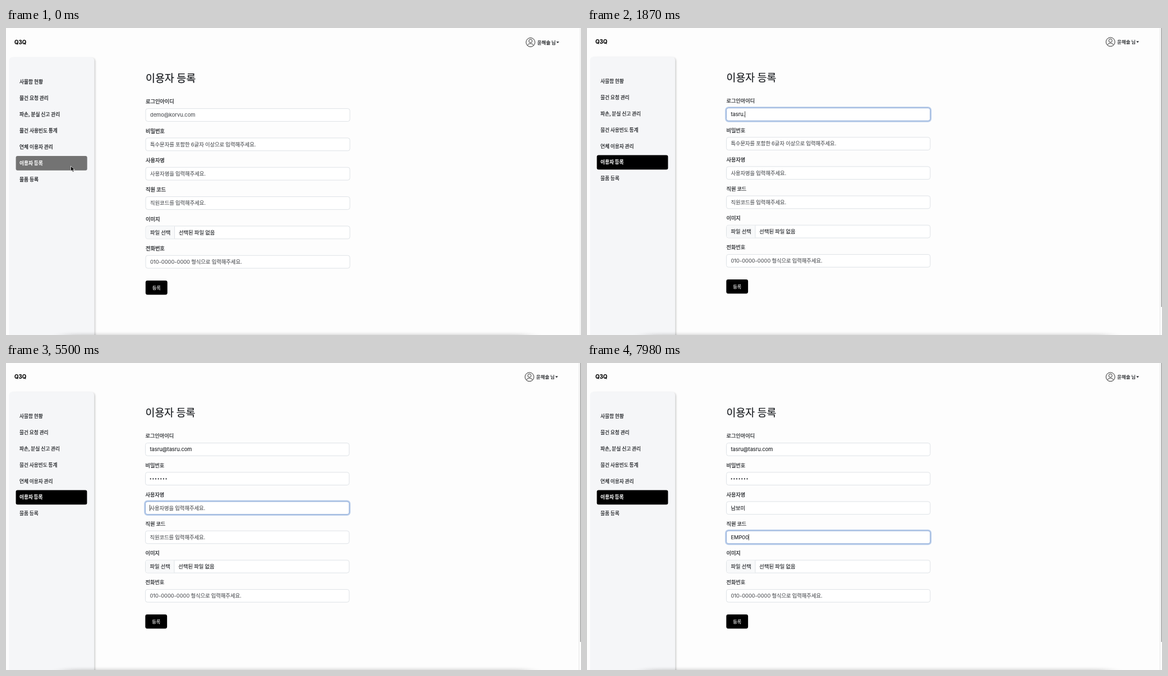
These frames come from a looping animation (1025x547 px, 8 s). An HTML page:

```html
<!DOCTYPE html>
<html lang="ko">
<head>
<meta charset="utf-8">
<style>
  html, body { margin: 0; width: 100%; height: 100%; overflow: hidden; background: #fdfdfd; }
  svg { display: block; }
  text {
    font-family: Inter, "Noto Sans CJK KR", "Noto Sans CJK", sans-serif;
    fill: currentColor; stroke: currentColor; stroke-width: .12px; word-spacing: -.4px; white-space: pre;
  }
  text[font-weight="500"] { stroke-width: .25px; }
</style>
</head>
<body>
<svg id="stage" width="1025" height="547" viewBox="0 0 1025 547">
  <defs>
    <filter id="soft" x="-20%" y="-5%" width="140%" height="110%"><feGaussianBlur stdDeviation="1.8"/></filter>
    <filter id="haze" x="-10%" y="-300%" width="120%" height="700%"><feGaussianBlur stdDeviation="14 3.5"/></filter>
  </defs>
  <rect width="1025" height="547" fill="#fdfdfd"/>
  <g id="page"></g>
  <rect x="105" y="547" width="825" height="8" fill="#000" opacity=".24" filter="url(#haze)"/>
  <path id="status" d="M0 544H147q3 0 3 3H0z"/>
  <rect id="thumb" x="1023.6" width="1.4" height="497" fill="#999"/>
  <path id="arrow" d="M0 0V9.2L2.2 7.2 3.7 10.4 5.3 9.7 3.9 6.6H6.9z" stroke="#fff" stroke-width=".7"/>
  <path id="beam" d="M-2-5Q0-5 0-4Q0-5 2-5M0-4V4M-2 5Q0 5 0 4Q0 5 2 5" fill="none" stroke="#222" stroke-width=".9"/>
</svg>
<script>
const LOOP = 8000, LEFT = 249, WIDTH = 364, STEP = 52.33, DOT = 4.65;
const INK = "#1c1f23", HINT = "#505357";
const $ = id => document.getElementById(id);
const page = $("page");

function add(tag, attrs, text) {
  const el = document.createElementNS("http://www.w3.org/2000/svg", tag);
  for (const k in attrs) el.setAttribute(k, attrs[k]);
  if (text) el.textContent = text;
  return page.appendChild(el);
}
const label = (x, y, size, text, weight = 400, color = INK) =>
  add("text", { x, y, "font-size": size, "font-weight": weight, style: `color:${color}` }, text);
const show = (el, on) => el.setAttribute("visibility", on ? "visible" : "hidden");
const ramp = (t, a, b) => Math.min(1, Math.max(0, (t - a) / (b - a)));
const ease = p => p * p * (3 - 2 * p);

// Header
add("path", { d: "M1023.5 0V560", stroke: "#e6e6e6" });
label(15, 29, 9.7, "Q3Q", 700, "#000");
add("circle", { cx: 935, cy: 25.5, r: 8, fill: "#f4f4f4", stroke: "#333", "stroke-width": 1 });
add("circle", { cx: 935, cy: 23.2, r: 3, fill: "none", stroke: "#333", "stroke-width": .9 });
add("path", { d: "M929.6 31.2Q930.5 27.6 935 27.6T940.4 31.2", fill: "none", stroke: "#333", "stroke-width": .9 });
label(947, 28.7, 8.5, "윤해솔 님", 500);
add("path", { d: "M981 24.2h5l-2.5 2.8z", fill: INK });

// Sidebar
add("rect", { x: 8, y: 53.5, width: 151.3, height: 510, rx: 6, opacity: .18, filter: "url(#soft)" });
add("rect", { x: 5.5, y: 52, width: 152, height: 510, rx: 6, fill: "#f5f6f8" });
const active = add("rect", { x: 17.6, y: 227.9, width: 127.1, height: 25.8, rx: 3 });
["사물함 현황", "물건 요청 관리", "파손, 분실 신고 관리", "물건 사용빈도 통계", "연체 이용자 관리", "이용자 등록", "물품 등록"]
  .forEach((s, i) => label(24, 99.2 + i * 28.92, 8.7, s, i == 5 ? 700 : 500, i == 5 ? "#fff" : INK));

// Form
label(249, 95.6, 18.4, "이용자 등록", 500);
const typed = (word, times) => times.map((t, i) => [t, word.slice(0, i + 1)]);
const mail = "tasru@tasru.com";
const fields = [
  { name: "로그인아이디", hint: "demo@korvu.com", from: 1390, to: 4010, keys: [
    ...typed(mail, [1520, 1590, 1660, 1730, 1850]), [1870, "tasru."], [2220, "tasru"],
    ...typed(mail, [0, 0, 0, 0, 0, 2430, 2640, 2710, 2770, 2800, 2840, 3030, 3170, 3240, 3380]).slice(5)] },
  { name: "비밀번호", hint: "특수문자를 포함한 6글자 이상으로 입력해주세요.", from: 4080, to: 5290, secret: true,
    keys: typed("•••••••", [4490, 4560, 4630, 4700, 4770, 5030, 5100]) },
  { name: "사용자명", hint: "사용자명을 입력해주세요.", from: 5340, to: 7010, compose: true,
    keys: [[6070, "ㄴ"], [6140, "나"], [6270, "남"], [6410, "남ㅂ"], [6620, "남보"], [6750, "남봄"], [6880, "남보미"]] },
  { name: "직원 코드", hint: "직원코드를 입력해주세요.", from: 7010, to: 9000,
    keys: typed("EMP00", [7360, 7500, 7640, 7840, 7980]) },
  { name: "이미지", file: true },
  { name: "전화번호", hint: "010-0000-0000 형식으로 입력해주세요." }
];
fields.forEach((f, i) => {
  const y = 155 + i * STEP;
  label(LEFT, y - 20.6, 9.2, f.name, 500);
  f.ring = add("rect", { x: LEFT - .9, y: y - 12.3, width: WIDTH + 1.8, height: 24.6, rx: 4.6, fill: "none", stroke: "#b9cdea", "stroke-width": 3, opacity: 0 });
  f.box = add("rect", { x: LEFT, y: y - 11.4, width: WIDTH, height: 22.8, rx: 3.7, fill: "#fff", stroke: "#dee2e6" });
  if (f.file) {
    add("path", { d: `M300.5 ${y - 10.9}H252.5a3 3 0 0 0-3 3v15.8a3 3 0 0 0 3 3H300.5z`, fill: "#f8f9fa" });
    add("path", { d: `M300.5 ${y - 11}v22`, stroke: "#dee2e6" });
    label(257, y + 3.4, 9.3, "파일 선택");
    label(308, y + 3.4, 9.3, "선택된 파일 없음");
    return;
  }
  f.text = label(257, y + 3.4, 9.3, f.hint, 400, HINT);
  if (!f.keys) return;
  f.dots = add("path", { stroke: INK, "stroke-width": 2.1, "stroke-linecap": "round", "stroke-dasharray": `0 ${DOT}` });
  f.caret = add("path", { stroke: "#111", "stroke-width": .8 });
  f.line = add("path", { stroke: "#333", "stroke-width": .8 });
});
add("rect", { x: 248.8, y: 450, width: 38.9, height: 25.2, rx: 3.4 });
label(260.8, 465.6, 8.2, "등록", 400, "#fff");

function drawField(f, i, t) {
  const y = 155 + i * STEP;
  let value = "", last = f.from;
  for (const [at, s] of f.keys) if (t >= at) { value = s; last = at; }
  const focus = ramp(t, f.from, f.from + 150) * (1 - ramp(t, f.to, f.to + 150));
  f.ring.setAttribute("opacity", focus);
  f.box.setAttribute("stroke", focus > .4 ? "#8eabd8" : "#dee2e6");

  f.text.textContent = f.secret && value ? "" : value || f.hint;
  f.text.style.color = value ? INK : HINT;
  const n = value.length;
  show(f.dots, f.secret && n);
  if (f.secret) f.dots.setAttribute("d", `M258.2 ${y + .3}h${(n - 1) * DOT + .01}`);

  const on = t >= f.from && t < f.to;
  const x = 257 + (f.secret ? n * DOT : value ? f.text.getComputedTextLength() + .3 : 0);
  f.caret.setAttribute("d", `M${x} ${y - 5.5}v11`);
  show(f.caret, on && (t - last) % 1000 < 500);
  f.line.setAttribute("d", `M${x - 8.4} ${y + 5.2}h8`);
  show(f.line, on && f.compose && n);
}

function draw(t) {
  active.setAttribute("fill", `rgb(${Array(3).fill(Math.round(115 * (1 - ramp(t, 830, 980))))})`);
  fields.forEach((f, i) => f.keys && drawField(f, i, t));

  const zoom = ramp(t, 1260, 1460);
  page.setAttribute("transform", `translate(0 ${-.6 * zoom}) scale(${1 - .002 * zoom} ${1 - .003 * zoom})`);
  show($("thumb"), t >= 1460);
  show($("status"), t >= 860 && t < 1260);

  const a = ease(ramp(t, 740, 1060)), b = ease(ramp(t, 1190, 1390));
  const x = 115.5 + 188.5 * a + 20 * b, y = 246 - 79 * a - 11 * b;
  const over = y < 166;
  for (const id of ["arrow", "beam"]) {
    $(id).setAttribute("transform", `translate(${x} ${y})`);
    show($(id), t < 1520 && over == (id == "beam"));
  }
}

const start = performance.now();
function tick() {
  draw((performance.now() - start) % LOOP);
  requestAnimationFrame(tick);
}
tick();
</script>
</body>
</html>
```
